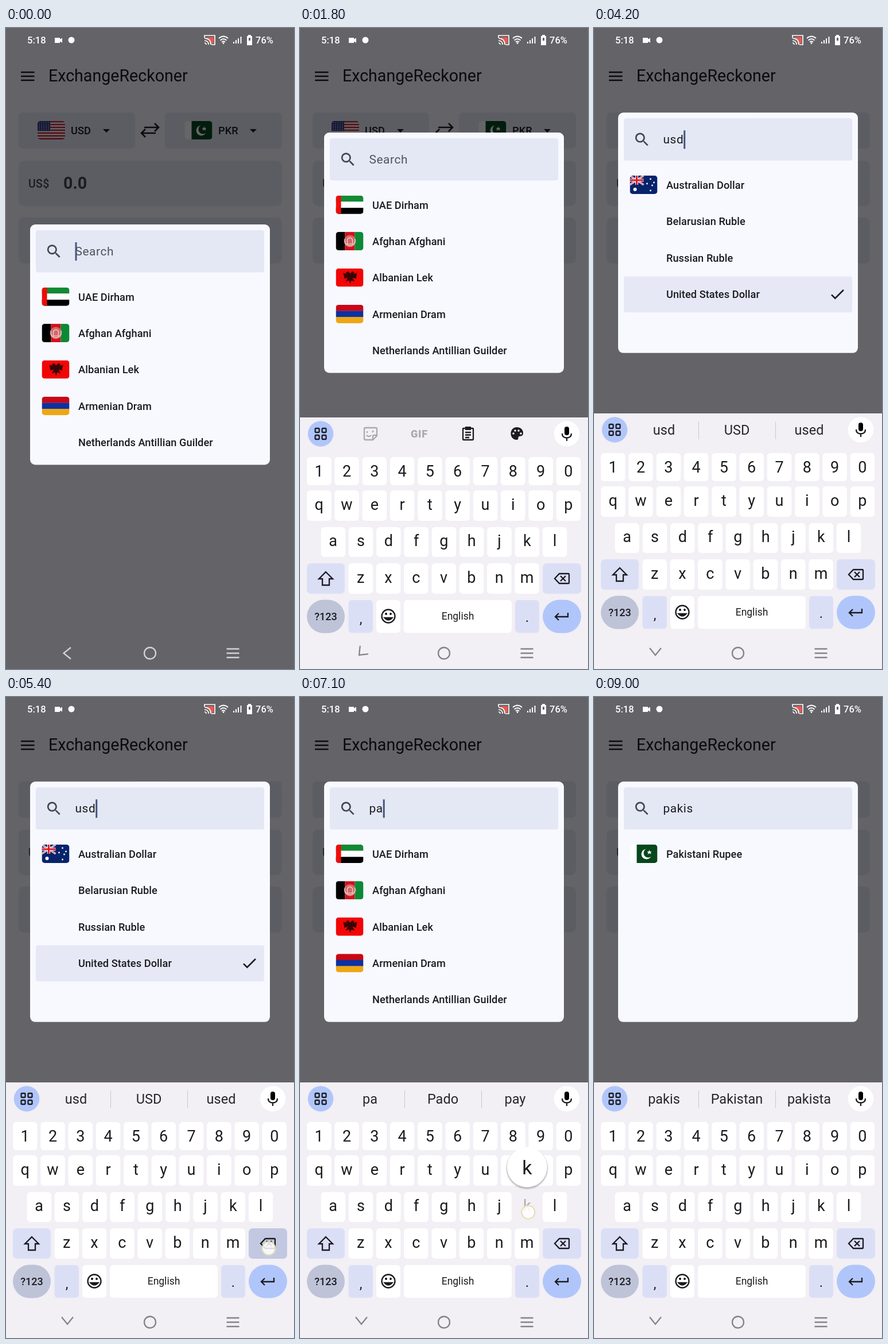
These frames come from a looping animation (502 by 1116 pixels, 9.2 s). An HTML page:

```html
<!DOCTYPE html>
<html lang="en">
<head>
<meta charset="utf-8">
<title>Currency search</title>
<style>
html, body { margin: 0; width: 100%; height: 100%; overflow: hidden; background: #636468; }
svg { display: block; width: 502px; height: 1116px; font-family: Roboto, sans-serif; }
.line { fill: none; stroke: #1b1b20; stroke-width: 2.3; }
.mid { text-anchor: middle; }
.row { font-size: 18.2px; font-weight: 500; letter-spacing: .06px; fill: #1a1b20; }
.field { font-size: 20.8px; letter-spacing: .6px; }
.key { font-size: 27px; fill: #1b1b1f; text-anchor: middle; }
.word { font-size: 23.5px; fill: #26262b; text-anchor: middle; }
</style>
</head>
<body>
<svg viewBox="0 0 502 1116">
  <defs><clipPath id="round"><rect width="48" height="32" rx="5"/></clipPath></defs>

  <g id="page">
    <rect width="502" height="1116" fill="#f8f9ff"/>
    <path class="line" style="stroke-width:2.6" d="M26 77H49.5M26 84H49.5M26 91H49.5"/>
    <text x="74" y="93" font-size="28.6" fill="#1a1b20">ExchangeReckoner</text>
    <g fill="#e8eaf4">
      <rect x="22" y="147" width="203" height="63" rx="7"/>
      <rect x="277" y="147" width="204" height="63" rx="7"/>
      <rect x="22" y="231" width="459" height="79" rx="9"/>
      <rect x="22" y="330" width="459" height="80" rx="9"/>
    </g>
    <g id="pair"></g>
    <text class="row" x="113" y="185">USD</text>
    <text class="row" x="370" y="185">PKR</text>
    <path d="M169 176h12l-6 6zM425 176h12l-6 6z" fill="#1a1b20"/>
    <path class="line" style="stroke-width:2.6" d="M241 173H266M259 166l7 7-7 7M261 183H236M243 176l-7 7 7 7"/>
    <text x="39" y="278" font-size="19.5" font-weight="500" letter-spacing=".4" fill="#44464f">US$</text>
    <text x="100" y="280" font-size="28.6" font-weight="700" fill="#44464f">0.0</text>
    <rect width="502" height="1116" fill="#000004" opacity=".6"/>
  </g>

  <g id="status" fill="#fff">
    <g font-size="16.5" font-weight="500"><text x="37" y="27">5:18</text><text x="435" y="27">76%</text></g>
    <path d="M85 17h9v2.5l4-2v8l-4-2v2.5h-9z"/>
    <circle cx="114" cy="21" r="5.5"/>
    <path d="M350 16h12v11h-5q-1-5-7-7z" fill="#e8594f"/>
    <path d="M346 17v-4h18v16h-6M346 26q3 0 3 3M346 22q7 0 7 7M346 18q11 0 11 11" fill="none" stroke="#fff" stroke-width="1.7"/>
    <path d="M371 18q8-7 16 0M373.5 21.5q5.5-5 11 0M376 24.5q3-2.5 6 0" fill="none" stroke="#fff" stroke-width="1.7"/>
    <circle cx="379" cy="26.5" r="1.4"/>
    <path d="M396 24h2v3h-2zM400 21h2v6h-2zM404 18h2v9h-2zM408.5 15h2v12h-2z"/>
    <path d="M422 12h5v2h2v16h-9v-16h2z"/>
    <path d="M423 17h3v5h-3z" fill="#636468"/>
  </g>

  <g id="dialog">
    <rect x="42" width="418" height="418.5" rx="9" fill="#f8f9ff"/>
    <rect x="52" y="10" width="398" height="73.5" rx="4" fill="#e4e8f4"/>
    <path transform="translate(68 31.4) scale(1.3)" fill="#44464f" d="M15.5 14h-.79l-.28-.27A6.5 6.5 0 1 0 9.5 16c1.61 0 3.09-.59 4.23-1.57l.27.28v.79l5 4.99L20.49 19zM9.5 14a4.5 4.5 0 1 1 0-9 4.5 4.5 0 0 1 0 9z"/>
    <text class="field" id="field" x="120.5" y="54"></text>
    <rect id="cursor" y="31" width="3" height="32" fill="#44567e"/>
    <g id="list"></g>
  </g>

  <g id="keyboard">
    <rect y="671" width="502" height="460" fill="#f2eff5"/>
    <circle cx="36" cy="699.5" r="22.3" fill="#b0c6fb"/>
    <g class="line"><rect x="26.5" y="690" width="7" height="7" rx="1.5"/><rect x="38.5" y="690" width="7" height="7" rx="1.5"/><rect x="26.5" y="702" width="7" height="7" rx="1.5"/><rect x="38.5" y="702" width="7" height="7" rx="1.5"/></g>
    <circle cx="465" cy="699.5" r="22.3" fill="#fff"/>
    <rect x="461" y="687" width="8" height="15" rx="4"/>
    <path class="line" d="M457 699q0 7.5 8 7.5t8-7.5M465 706v6"/>
    <g id="tools">
      <path class="line" style="stroke:#aaa9ae" d="M114 689h18q2 0 2 2v12l-7 7h-13q-2 0-2-2v-17q0-2 2-2zM134 702h-5q-2 0-2 2v6M117 695v3M128 694l-2 3M116 702q4 4 8 0"/>
      <text class="mid" x="208" y="706" font-size="18" font-weight="900" letter-spacing=".8" fill="#aaa9ae">GIF</text>
      <path class="line" d="M285 690h16q1 0 1 1v18q0 1-1 1h-16q-1 0-1-1v-18q0-1 1-1zM288 697h10M288 701.5h10M288 706h7"/>
      <path d="M288 687h10v6h-10z" fill="#1b1b20"/>
      <path d="M378 688c-14 0-14 22 0 22c4 0 1-5 4-6c3-1 7 0 7-6c0-6-5-10-11-10z" fill="#1b1b20"/>
      <g fill="#f2eff5"><circle cx="372" cy="699" r="1.8"/><circle cx="375" cy="694" r="1.8"/><circle cx="381" cy="694" r="1.8"/><circle cx="385" cy="699" r="1.8"/></g>
    </g>
    <g id="words"><path d="M182.5 685v31M316.5 685v31" stroke="#c9c7cd"/>
      <text class="word" x="122" y="708"></text><text class="word" x="249" y="708"></text><text class="word" x="375" y="708"></text></g>
    <g id="keys"></g>
    <path class="line" d="M45 940l12 12h-6v11h-12v-11h-6z"/>
    <path class="line" d="M452 943h16q1 0 1 1v15q0 1-1 1h-16l-8-8.5zM454 947l9 9M463 947l-9 9"/>
    <g class="line"><circle cx="154" cy="1017" r="11.5"/><path d="M147.5 1020q6.5 7 13 0z" fill="#1b1b20"/></g>
    <circle cx="150" cy="1013" r="1.9"/><circle cx="158" cy="1013" r="1.9"/>
    <path class="line" d="M467 1011v7h-22M451 1012l-6 6 6 6"/>
    <g fill="#1b1b20" class="mid">
      <text x="45" y="1024" font-size="18" font-weight="500">?123</text>
      <text x="106" y="1030" font-size="24">,</text>
      <text x="275" y="1023" font-size="17.5">English</text>
      <text x="396" y="1027" font-size="24">.</text>
    </g>
    <g id="popup">
      <circle r="37" cy="2.5" fill="#000" opacity=".08"/><circle r="36" cy="1.5" fill="#000" opacity=".16"/>
      <circle r="35" fill="#fff"/><text class="key" y="12.5" style="font-size:34px"></text>
    </g>
    <circle id="touch" r="11.5" fill="#fff" fill-opacity=".85" stroke="#e5dfb0" stroke-width="2"/>
  </g>

  <g id="nav" fill="none" stroke-width="2.3">
    <path id="back" d="M113 1078.5L100.5 1088.5 113 1098.5"/>
    <circle cx="251" cy="1088.5" r="10"/>
    <path d="M384.5 1081h22M384.5 1088.5h22M384.5 1096h22"/>
  </g>
</svg>

<script>
const $ = id => document.getElementById(id);
const show = (el, on) => el.style.display = on ? '' : 'none';
const box = (x, y, w, h, fill, rx = 0, id = '') =>
  `<rect id="${id}" x="${x}" y="${y}" width="${w}" height="${h}" rx="${rx}" fill="${fill}"/>`;
const dot = (x, y, r, fill) => `<circle cx="${x}" cy="${y}" r="${r}" fill="${fill}"/>`;
const path = (d, stroke, width) => `<path d="${d}" fill="none" stroke="${stroke}" stroke-width="${width}"/>`;
const bands = (...colors) => colors.map((c, i) => box(0, i * 32 / colors.length, 48, 32 / colors.length + .2, c)).join('');

const flags = {
  ae: bands('#128a35', '#fff', '#000') + box(0, 0, 9, 32, '#f00a0a'),
  af: box(0, 0, 16, 32, '#000') + box(16, 0, 17, 32, '#d0121c') + box(33, 0, 15, 32, '#0b8a35') +
    '<circle cx="24.5" cy="16" r="10.5" fill="#d9a09c" opacity=".6"/>' +
    path('M16 12a9 9 0 1 0 17 0M20 21v-8q4.5-6 9 0v8z', '#efd4d0', 1.3),
  al: box(0, 0, 48, 32, '#f20505') +
    '<path d="M25 9l-4-4-4 3 4 2-8-2 2 10 6-2-4 7 6-2 2 6 2-6 6 2-4-7 6 2 2-10-8 2 4-2-4-3z" fill="#3a0505"/>',
  am: bands('#c90716', '#0d31a0', '#eea713'),
  au: box(0, 0, 48, 32, '#07236c') + path('M0 0L24 16M24 0L0 16', '#fff', 3) + path('M0 0L24 16M24 0L0 16', '#d81a2c', 1) +
    path('M12 0V16M0 8H24', '#fff', 5) + path('M12 0V16M0 8H24', '#d81a2c', 3) +
    dot(9, 24, 3, '#fff') + [[36, 6], [30, 14], [42, 12], [36, 26], [39, 17]].map(p => dot(...p, 1.4, '#fff')).join(''),
  pk: box(0, 0, 48, 32, '#fff') + box(12, 0, 36, 32, '#06471c') + dot(29, 16.5, 9, '#fff') + dot(32, 14.5, 8, '#06471c') +
    '<path d="M34 9l1 3 3 0-2 2 1 3-3-2-3 2 1-3-2-2 3 0z" fill="#fff"/>',
  us: bands(...Array.from({length: 13}, (_, i) => i % 2 ? '#fff' : '#c8202f')) + box(0, 0, 22, 17.2, '#313c80') +
    Array.from({length: 20}, (_, i) => dot(3 + i % 5 * 4, 3 + (i / 5 | 0) * 3.7, .8, '#fff')).join('')
};
const flag = (name, x, y) => name ? `<g transform="translate(${x} ${y})" clip-path="url(#round)">${flags[name]}</g>` : '';

const check = box(52, 285, 398, 63, '#e6e9f5', 4) +
  '<path transform="translate(408.6 300.5) scale(1.3)" fill="#1a1b20" d="M9 16.17L4.83 12l-1.42 1.41L9 19 21 7l-1.41-1.41z"/>';
const list = (rows, extra = '') => extra + rows.map(([name, label], i) =>
  flag(name, 62.5, 109.7 + i * 63.4) + `<text class="row" x="126" y="${132.5 + i * 63.4}">${label}</text>`).join('');
const lists = {
  all: list([['ae', 'UAE Dirham'], ['af', 'Afghan Afghani'], ['al', 'Albanian Lek'], ['am', 'Armenian Dram'], ['', 'Netherlands Antillian Guilder']]),
  usd: list([['au', 'Australian Dollar'], ['', 'Belarusian Ruble'], ['', 'Russian Ruble'], ['', 'United States Dollar']], check),
  pakis: list([['pk', 'Pakistani Rupee']])
};
const guesses = {
  u: 'u up us', us: 'us US use', usd: 'usd USD used',
  p: 'p P please', pa: 'pa Pado pay', pak: 'pak Pakistan pack', paki: 'paki Pakistan pakis', pakis: 'pakis Pakistan pakista'
};

// Keyboard layout
const PITCH = 48.3, spots = {'<': [456, 951]};
let keys = '';
[['1234567890', 12, 740, 49, 774], ['qwertyuiop', 12, 798, 53, 832],
 ['asdfghjkl', 36.5, 862, 52, 895], ['zxcvbnm', 84.5, 925, 53, 958.5]].forEach(([chars, x0, y, h, base]) => {
  [...chars].forEach((c, i) => {
    const x = x0 + i * PITCH;
    spots[c] = [x + 21.2, y + 26];
    keys += box(x, y, 42.5, h, '#fff', 6, 'k' + c) + `<text class="key" id="t${c}" x="${x + 21.2}" y="${base}">${c}</text>`;
  });
});
keys += box(12, 925, 66, 53, '#dbdff6', 7) + box(423, 925, 67, 53, '#dbdff6', 7, 'k<') +
  box(12, 988.5, 66, 58, '#bec3d8', 29) + box(84.5, 989, 42.5, 57, '#dbdff6', 6) + box(133, 989, 42, 57, '#fff', 6) +
  box(181, 989, 188, 57, '#fff', 6) + box(375, 989, 42, 57, '#dbdff6', 6) + box(423, 988.5, 67, 58, '#b0c6fb', 29);
$('keys').innerHTML = keys;
$('pair').innerHTML = flag('us', 55, 162) + flag('pk', 311.5, 162);

// Key, time down, time up
const presses = [['u', 3300, 3500], ['s', 3500, 3700], ['d', 3700, 3900],
  ['<', 5300, 5500], ['<', 5500, 5700], ['<', 5700, 5900],
  ['p', 6500, 6700], ['a', 6700, 6900], ['k', 7000, 7200], ['i', 7200, 7400], ['s', 7400, 7600]];
const blinks = [500, 1000, 1400, 2200, 2800, 3100, 4900, 5300, 8100];

const steps = (t, start, values) => values[Math.max(0, Math.min(values.length - 1, (t - start) / 100 + 1))];
const move = (el, x, y) => el.setAttribute('transform', `translate(${x} ${y})`);
let lastList, pressed;

function paintKey(c, down) {
  $('k' + c).setAttribute('fill', c == '<' ? (down ? '#c3c8e2' : '#dbdff6') : (down ? '#f2eff5' : '#fff'));
  if (c != '<') $('t' + c).style.fill = down ? '#aaa9ae' : '';
}

function draw(t) {
  const text = presses.reduce((s, [c, , up]) => t < up ? s : c == '<' ? s.slice(0, -1) : s + c, '');
  const open = t >= 1700;

  move($('dialog'), 0, steps(t, 1700, [342, 285, 182, 156, 149, 147.3]));
  move($('keyboard'), 0, steps(t, 1700, [445, 130, 7, 0]));
  show($('keyboard'), open);
  $('nav').setAttribute('stroke', open ? '#85838a' : '#d3d3d6');
  $('back').setAttribute('transform', `rotate(${steps(t, 1700, [0, -10, -45, -80, -90])} 105.5 1087)`);

  const field = $('field');
  field.textContent = text || 'Search';
  field.setAttribute('fill', text ? '#1a1b20' : '#50525c');
  $('cursor').setAttribute('x', 120.5 + (text ? field.getComputedTextLength() : 0));
  show($('cursor'), blinks.filter(b => b <= t).length % 2 == 0);

  const name = t >= 7900 ? 'pakis' : t >= 4200 && t < 6000 ? 'usd' : 'all';
  if (name != lastList) $('list').innerHTML = lists[lastList = name];

  show($('tools'), !text);
  show($('words'), text);
  if (text) guesses[text].split(' ').forEach((w, i) => $('words').querySelectorAll('text')[i].textContent = w);

  const touch = presses.find(([, down, up]) => t >= down && t < up);
  const held = presses.find(([, down, up]) => t > down && t <= up);
  show($('touch'), touch);
  if (touch) {
    const [x, y] = spots[touch[0]];
    move($('touch'), x + (touch[0] == 'u' ? 13 : 2), y + (touch[0] == 'u' ? 13 : 9));
  }
  if (pressed) paintKey(pressed, false);
  pressed = held && held[0];
  if (pressed) paintKey(pressed, true);
  const bubble = pressed && pressed != '<';
  show($('popup'), bubble);
  if (bubble) {
    const [x, y] = spots[pressed];
    move($('popup'), x, y - 69.5);
    $('popup').querySelector('text').textContent = pressed;
  }
}

let last = -1;
function frame() {
  const t = Math.floor(performance.now() % 9200 / 100) * 100;
  if (t != last) draw(last = t);
  requestAnimationFrame(frame);
}
frame();
</script>
</body>
</html>
```
